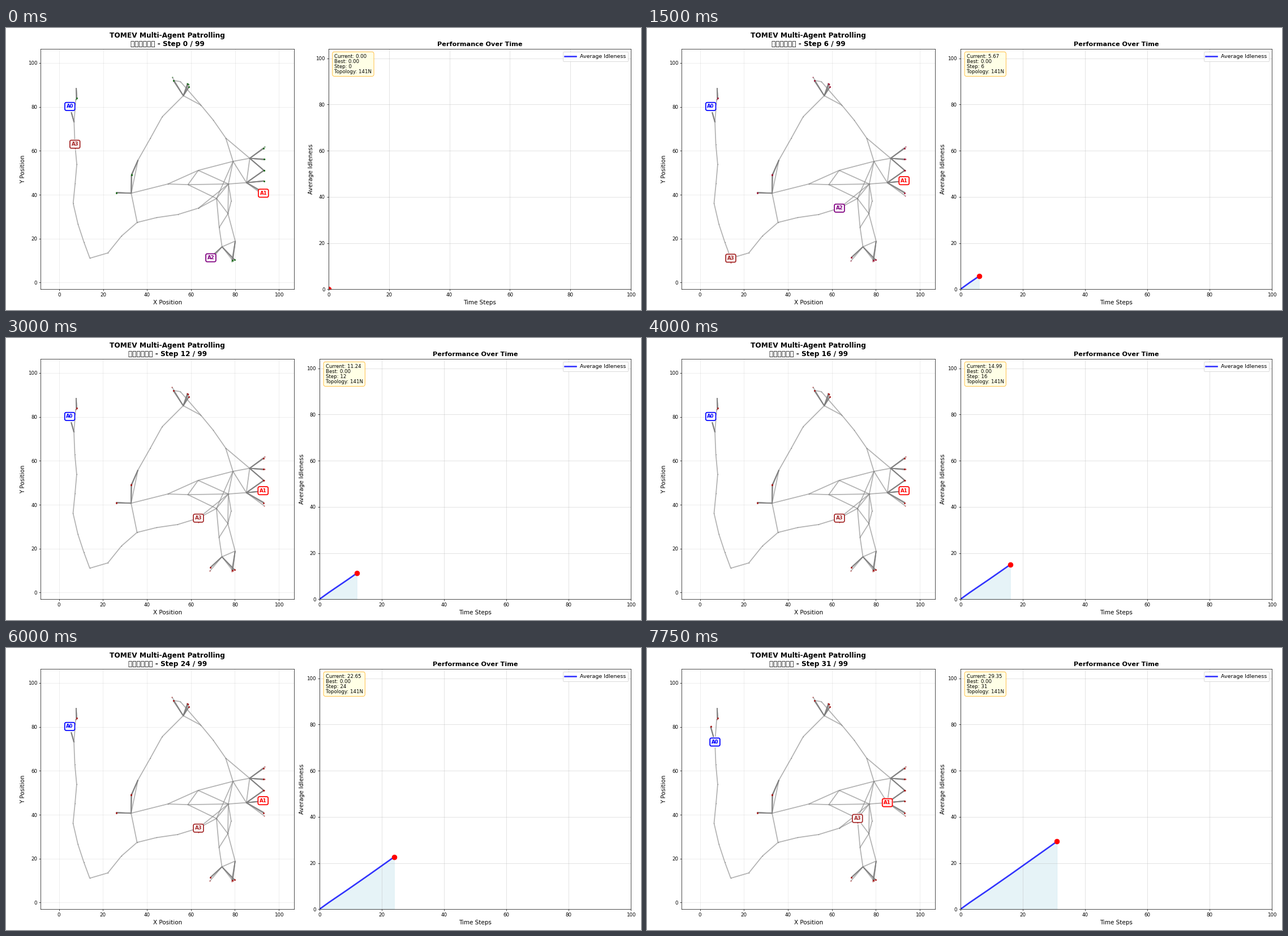
Recreate the animation shown at these times as a matplotlib script. Size 1122x499 px, loop 8000 ms.

```python
import random

import matplotlib.pyplot as plt
import numpy as np
from matplotlib.animation import FuncAnimation
from matplotlib.collections import LineCollection

W, H, DPI = 1122, 499, 62.5
STEPS = 32

plt.rcParams.update({"font.family": "DejaVu Sans", "font.size": 10})
random.seed(4)

# Patrol graph: chains of waypoints sharing junctions
A, J = (6.8, 73.1), (71.6, 38.3)
SW, WEST, TOP = (35.5, 27.4), (32.8, 40.7), (56.5, 85.1)
NW, NE, ELBOW = (35.9, 55.8), (64.5, 80.8), (75.8, 65.8)
P, Q, R1, R2 = (79.1, 55.2), (77, 44.9), (86.7, 56.6), (85.2, 45.5)
M1, M2, M3 = (49.5, 44.9), (58.6, 44.6), (63.3, 51.1)
S1, S2, B1, B2 = (76.8, 31.4), (72.8, 25.1), (74.1, 16.3), (80.1, 18.9)
MEET = (63.4, 33.9)
COAST = [(7.2, 63), (8.05, 53.8), (7.3, 45.2), (6.4, 36.1), (8.6, 26.6),
         (11.3, 18.4), (14, 11.1), (22.2, 13.5), (28.4, 21.2), SW,
         (44.4, 29.6), (54, 31), MEET, J]
CHAINS = [
    [(7.6, 83.5), A] + COAST,
    [SW, WEST, NW, (41.5, 65.7), (46.9, 75.5), TOP, NE, (70.1, 74), ELBOW, R1, R2],
    [(51.8, 92.1), (55.2, 91.5), NE],
    [ELBOW, P, R1], [P, R2, Q, P, J, Q, MEET],
    [WEST, M1, M2, Q, M3, M2, J, S1, Q, (78.3, 37.2), S1, B2, B1, S2, J],
    [M1, M3, P], [S1, S2],
]

# Bundles of near-identical edges: hub, leaf, outer tip
BUNDLES = [
    (A, (4.9, 80.2), (4.9, 80.4)),
    ((7.8, 88.6), (7.95, 84), (7.8, 83.6)),
    (WEST, (26, 40.9), (26, 41)),
    (WEST, (32.9, 49), (32.9, 49.2)),
    (NW, (32.9, 49), (32.9, 49.2)),
    (TOP, (52, 92), (51.4, 93.6)),
    (TOP, (59, 89.1), (58.9, 90.2)),
    (TOP, (58.5, 90.4), (58.3, 90.8)),
    (R1, (93, 61.1), (93.5, 61.8)),
    (R1, (93.1, 56.1), (93.4, 56.3)),
    (R1, (93.1, 51.1), (93.2, 51)),
    (R2, (93.1, 51.1), (93.2, 51)),
    (R2, (93.1, 46.2), (93.3, 46.2)),
    (R2, (93, 40.9), (93.2, 39.6)),
    (B1, (68.9, 11.4), (68.6, 9.8)),
    (B1, (79.8, 10.4), (79, 10)),
    (B2, (78.9, 10.1), (78.5, 9.7)),
]
LEAVES = [leaf for _, leaf, _ in BUNDLES]
TIPS = [tip for *_, tip in BUNDLES]

COLORS = ["blue", "red", "purple", "brown"]
TINTS = ["#e8e8ff", "#ffe6e6", "#fbf4fb", "#f8e9e9"]
A2_START = [(69, 11.3), B1, S2, J]


def agent_spots(k):
    """Each agent moves one waypoint per step, then shuttles on one edge."""
    odd = k % 2
    shuttle = J if odd else MEET
    a0 = A if odd else LEAVES[0]
    a1 = R2 if odd else ((92.9, 40.7) if k == 0 else (92.8, 46.4))
    a2 = A2_START[k] if k < 4 else shuttle
    a3 = COAST[k] if k < 13 else shuttle
    return [a0, a1, a2, a3]


def idleness(k):
    return np.interp(k, [0, 3, 9, 16, 20, 27, 31],
                     [0, 2.91, 8.42, 14.99, 18.82, 25.52, 29.35])


def place(ax, x0, x1, top=37.3, bottom=462.3):
    ax.set_position([x0 / W, 1 - bottom / H, (x1 - x0) / W, (bottom - top) / H])


def jitter(point, r):
    return tuple(c + random.uniform(-r, r) for c in point)


fig = plt.figure(figsize=(W / DPI, H / DPI), dpi=DPI, facecolor="white")
ax_map, ax_perf = fig.add_subplot(121), fig.add_subplot(122)

# Map panel
ax_map.set(xlim=(-8.34, 106.95), ylim=(-3.04, 106.33))
ax_map.set_xlabel("X Position", fontsize=12)
ax_map.set_ylabel("Y Position", fontsize=12)
ax_map.set_xticks(range(0, 101, 20))
ax_map.set_yticks(range(0, 101, 20))
ax_map.grid(alpha=0.3)
map_title = ax_map.set_title("", fontsize=14, fontweight="bold")

edges = [pair for chain in CHAINS for pair in zip(chain, chain[1:])]
for hub, leaf, tip in BUNDLES:
    edges += [(hub, jitter(leaf, 0.2)) for _ in range(3)]
    edges += [(hub, leaf), (hub, tip)]
ax_map.add_collection(LineCollection(edges, colors="gray", linewidths=2,
                                     alpha=0.6, zorder=1.8))
ax_map.scatter(*zip(*sum(CHAINS, [])), s=2.5, c="#808080", lw=0, zorder=2)
tips = ax_map.scatter(*zip(*TIPS), s=7, lw=0, alpha=0.6, zorder=2)
leaves = ax_map.scatter(*zip(*LEAVES), s=12, lw=0, zorder=2.1)

halos = ax_map.scatter([0] * 4, [0] * 4, s=500, c="white", lw=0, zorder=3)
pointer, = ax_map.plot([], [], "v", color="brown", ms=4, mew=0, zorder=4)
labels = [
    ax_map.text(0, 0, f"A{i}", color=c, fontsize=10, fontweight="bold",
                ha="center", va="center", zorder=5 + i,
                bbox=dict(boxstyle="round,pad=0.3", fc="white", ec=c, lw=2))
    for i, c in enumerate(COLORS)
]

# Performance panel
ax_perf.set(xlim=(0, 100), ylim=(0, 104))
ax_perf.set_xlabel("Time Steps", fontsize=12)
ax_perf.set_ylabel("Average Idleness", fontsize=12)
ax_perf.set_title("Performance Over Time", fontsize=13, fontweight="bold")
ax_perf.grid(alpha=0.5)
curve, = ax_perf.plot([], [], color="blue", lw=3, alpha=0.8,
                      label="Average Idleness")
head, = ax_perf.plot([], [], "ro", ms=10)
ax_perf.legend(loc="upper right", fontsize=11)
stats = ax_perf.text(0.02, 0.98, "", transform=ax_perf.transAxes, va="top",
                     fontsize=10, linespacing=1.0, zorder=4,
                     bbox=dict(boxstyle="round,pad=0.42", fc="lightyellow",
                               ec="orange", alpha=0.8))
fills = []


def update(k):
    shift = 0.2 if k == 0 else 0
    place(ax_map, 61.2 + shift, 509.2 + shift)
    place(ax_perf, 569.7 if k == 0 else 553.7, 1104.2)

    # These characters have no glyph in the font and show as empty boxes
    map_title.set_text(f"TOMEV Multi-Agent Patrolling\n多智能体巡逻 - Step {k} / 99")
    tone = "#1c6b1c" if k == 0 else "#a01434" if k < 12 else "#a81c1c"
    leaves.set_color(tone)
    tips.set_color(tone)

    spots = agent_spots(k)
    halos.set_offsets(spots)
    stacked = spots[2] == spots[3]
    tinted = [k % 2, k % 2, True, not stacked]
    for label, spot, tint, on in zip(labels, spots, TINTS, tinted):
        label.set_position(spot)
        label.get_bbox_patch().set_facecolor(tint if on else "white")
    labels[2].set_visible(not stacked)
    pointer.set_data([spots[3][0]], [spots[3][1] - 1.85])

    t = np.arange(k + 1)
    y = idleness(t)
    curve.set_data(t, y)
    head.set_data([k], [y[-1]])
    stats.set_text(f"Current: {y[-1]:.2f}\nBest: 0.00\nStep: {k}\nTopology: 141N")
    while fills:
        fills.pop().remove()
    if k > 4:
        fills.append(ax_perf.fill_between(t, y, color="lightblue", alpha=0.3))
    return []


anim = FuncAnimation(fig, update, frames=STEPS, interval=250, repeat=True,
                     repeat_delay=0, blit=False)
plt.show()
```
